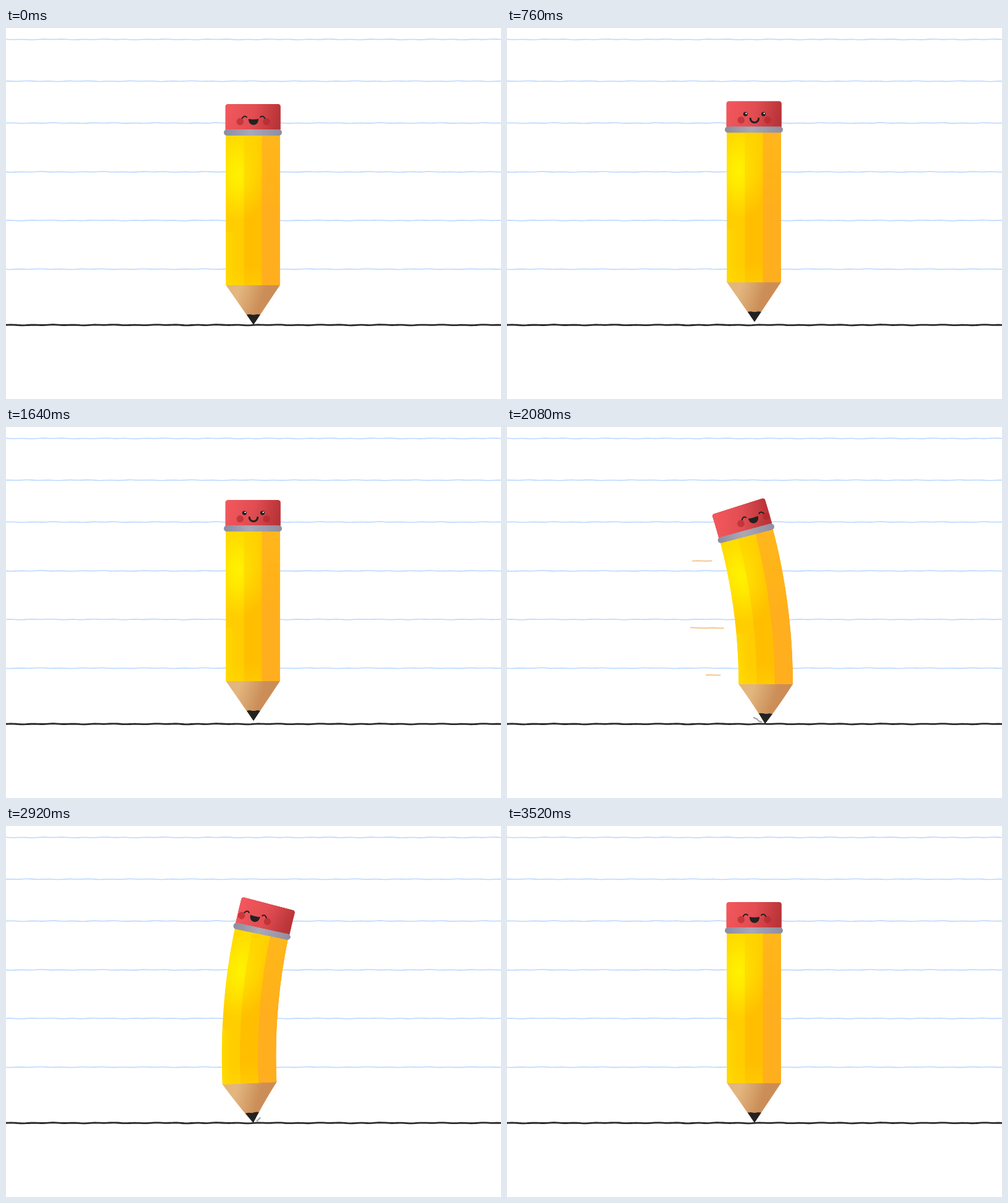
Write an HTML page with a canvas that moves like this. It is 800x600 px and loops after 3560 ms.

```html
<!DOCTYPE html>
<html lang="en">
<head>
<meta charset="utf-8">
<title>Hopping pencil</title>
<style>
  html, body { margin: 0; width: 100%; height: 100%; overflow: hidden; background: #fff; }
  canvas { display: block; }
</style>
</head>
<body>
<canvas id="stage" width="800" height="600"></canvas>
<script>
const ctx = document.getElementById('stage').getContext('2d');
const LOOP = 3560, CYCLE = 890, STEP = 40;
const TIP = 480, HEIGHT = 358;
const INK = '#222';

// The upright pencil is painted here first, then bent onto the stage.
const SCALE = 2, PAD_X = 60, PAD_TOP = 6;
const sprite = document.createElement('canvas');
sprite.width = 2 * PAD_X * SCALE;
sprite.height = (HEIGHT + PAD_TOP) * SCALE;
const pen = sprite.getContext('2d');

const clamp = (v, lo = 0, hi = 1) => Math.min(hi, Math.max(lo, v));
const smooth = (t, a, b) => { const u = clamp((t - a) / (b - a)); return u * u * (3 - 2 * u); };

// Linear interpolation through [time, value] pairs.
function track(t, keys) {
  if (t <= keys[0][0]) return keys[0][1];
  for (let i = 1; i < keys.length; i++) {
    const [t0, v0] = keys[i - 1], [t1, v1] = keys[i];
    if (t <= t1) return v0 + (v1 - v0) * (t - t0) / (t1 - t0);
  }
  return keys[keys.length - 1][1];
}

function gradient(x0, y0, x1, y1, ...stops) {
  const g = pen.createLinearGradient(x0, y0, x1, y1);
  stops.forEach(([at, color]) => g.addColorStop(at, color));
  return g;
}

function glow(x, y, r, color) {
  const g = pen.createRadialGradient(x, y, 0, x, y, r);
  g.addColorStop(0, `rgba(${color},1)`);
  g.addColorStop(0.35, `rgba(${color},.75)`);
  g.addColorStop(1, `rgba(${color},0)`);
  return g;
}

function fill(color, draw) {
  pen.fillStyle = color;
  pen.beginPath();
  draw();
  pen.fill();
}

function polygon(...points) {
  points.forEach(([x, y]) => pen.lineTo(x, y));
  pen.closePath();
}

const disc = (x, y, r, color) => fill(color, () => pen.arc(x, y, r, 0, 7));

function stroke(width, draw) {
  pen.strokeStyle = INK;
  pen.lineWidth = width;
  pen.lineCap = 'round';
  pen.beginPath();
  draw();
  pen.stroke();
}

function paintFace(laughing) {
  const cheekY = laughing ? 151.5 : 153.5;
  for (const x of [378.3, 421]) disc(x, cheekY, 5.7, 'rgba(180,38,44,.62)');
  if (laughing) {
    for (const side of [-1, 1]) {
      stroke(2, () => {
        pen.moveTo(400 + side * 18.3, 146);
        pen.quadraticCurveTo(400 + side * 14.5, 140.5, 400 + side * 11, 144.2);
      });
    }
    fill(INK, () => {
      pen.moveTo(392, 147);
      pen.quadraticCurveTo(400, 148.5, 408, 147);
      pen.bezierCurveTo(408.5, 160, 391.5, 160, 392, 147);
    });
  } else {
    for (const x of [385.3, 414.5]) {
      disc(x, 143.8, 3.6, INK);
      disc(x + 1.2, 142.8, 1.2, '#fff');
    }
    stroke(3, () => {
      pen.moveTo(393.3, 151);
      pen.bezierCurveTo(394, 159.5, 406, 159.5, 406.7, 151);
    });
  }
}

function paintPencil(laughing, look) {
  pen.setTransform(1, 0, 0, 1, 0, 0);
  pen.clearRect(0, 0, sprite.width, sprite.height);
  pen.setTransform(SCALE, 0, 0, SCALE, (PAD_X - 400) * SCALE, (HEIGHT + PAD_TOP - TIP) * SCALE);

  // Wood and lead
  const wood = gradient(378, 424, 425, 440, [0, '#e2b67e'], [0.75, '#cc8f59'], [1, '#cb8d57']);
  fill(wood, () => polygon([355.5, 415], [442.7, 415], [442.7, 416], [400, TIP], [355.5, 416]));
  fill(INK, () => polygon([388.8, 463.5], [394, 463], [400, 464], [406, 463], [411, 463.5], [400, TIP]));

  // Three painted faces with a shared highlight
  [[355.3, 29.4, '#ffcd00'], [384.5, 29.2, '#ffbf00'], [413.5, 29.4, '#ffae1e']].forEach(([x, w, color], i) => {
    const box = () => pen.rect(x, 172, w, 244);
    fill(color, box);
    fill(gradient(0, 172, 0, 310,
      [0, ['rgba(255,214,0,.7)', 'rgba(255,214,0,.8)', 'rgba(255,186,30,.7)'][i]],
      [1, 'rgba(255,190,0,0)']), box);
    pen.save();
    pen.beginPath();
    box();
    pen.clip();
    pen.translate(376, 236);
    pen.scale(0.62, 1);
    pen.globalAlpha = [1, 0.62, 0.1][i];
    pen.fillStyle = glow(0, 0, 78, '255,242,0');
    pen.fillRect(-100, -100, 250, 250);
    pen.restore();
  });
  fill(gradient(355, 0, 372, 0, [0, 'rgba(255,226,0,.55)'], [1, 'rgba(255,226,0,0)']),
    () => pen.rect(355.3, 330, 17, 86));
  fill(gradient(0, 385, 0, 416, [0, 'rgba(255,225,0,0)'], [1, 'rgba(255,225,0,.3)']),
    () => pen.rect(355.3, 385, 58, 31));

  // Eraser, face and ferrule
  pen.save();
  const rubber = gradient(356, 130, 444, 152, [0, '#f2585d'], [0.5, '#e14d52'], [0.95, '#b93438']);
  fill(rubber, () => pen.roundRect(354.5, 123, 89.3, 44, 4));
  pen.clip();
  pen.translate(look, 0);
  paintFace(laughing);
  pen.restore();
  fill(gradient(352, 0, 446, 0, [0, '#8d8ca0'], [0.45, '#aaa8b6'], [1, '#8f8d9f']),
    () => pen.roundRect(352, 164, 94, 10, 5));
}

// Places the painted pencil with its tip at (x, y); lean is in degrees, curve in degrees per pixel.
function placePencil({ x, y, lean = 0, curve = 0, squash = 0 }) {
  const rad = Math.PI / 180;
  ctx.save();
  ctx.translate(x, y);
  ctx.scale(1 + squash, 1 - squash / 2);
  if (Math.abs(curve) < 0.001) {
    ctx.rotate(lean * rad);
    ctx.drawImage(sprite, -PAD_X, -HEIGHT - PAD_TOP, 2 * PAD_X, HEIGHT + PAD_TOP);
  } else {
    const slice = 2;
    let px = 0, py = 0;
    for (let s = 0; s < HEIGHT + PAD_TOP; s += slice) {
      const angle = (lean + curve * (s + slice / 2)) * rad;
      const top = HEIGHT + PAD_TOP - s - slice;
      const h = Math.min(slice + 1, HEIGHT + PAD_TOP - top);
      ctx.save();
      ctx.translate(px, py);
      ctx.rotate(angle);
      ctx.drawImage(sprite, 0, top * SCALE, sprite.width, h * SCALE, -PAD_X, -slice, 2 * PAD_X, h);
      ctx.restore();
      px += Math.sin(angle) * slice;
      py -= Math.cos(angle) * slice;
    }
  }
  ctx.restore();
}

// Slightly uneven hand-drawn horizontal line.
function roughLine(x0, x1, y, width, color, cap = 'butt') {
  ctx.strokeStyle = color;
  ctx.lineWidth = width;
  ctx.lineCap = cap;
  ctx.beginPath();
  for (let x = x0; x < x1; x += 4) {
    ctx.lineTo(x, y + 0.3 * Math.sin(x * 0.19 + y) + 0.25 * Math.sin(x * 0.071 + 2 * y));
  }
  ctx.lineTo(x1, y);
  ctx.stroke();
}

function paper() {
  ctx.fillStyle = '#fff';
  ctx.fillRect(0, 0, 800, 600);
  for (const y of [18.5, 86, 153.7, 232.7, 311.2, 390]) roughLine(0, 800, y, 1.6, '#bcd8ff');
  roughLine(0, 800, 480.3, 2.8, '#2b2b2b');
}

// Each streak: start offset behind centre, length, speed, start time, height, rise.
const STREAKS = [
  [100, 200, 0.96, 268, 216.5, 2],
  [103, 270, 1.25, 258, 325, 1],
  [78, 260, 1.4, 284, 401.3, 4]
];

function streaks(t, dir) {
  for (const [start, length, speed, begin, y, rise] of STREAKS) {
    const front = clamp((t - begin) * speed, 0, length);
    const back = length * clamp((t - 300) / 260) ** 2.2;
    if (front - back < 1) continue;
    const a = 400 - dir * (start - front), b = 400 - dir * (start - back);
    roughLine(Math.min(a, b), Math.max(a, b), y - rise * clamp((t - 300) / 130, 0, 1.5), 2, '#f3c795', 'round');
  }
}

// Dashes kicked up behind the tip: x0, y0, x1, y1.
const DUST = [
  [[6, -3, 11, -8]],
  [[6, -3, 11, -5], [12, -7, 18, -10]],
  [[4, -3, 10, -6], [11, -3, 17, -3], [13, -10, 19, -13], [13, -6, 20, -8]]
];

function dust(t, dir, x) {
  if (t < 240) return;
  ctx.strokeStyle = '#a2a2a2';
  ctx.lineWidth = 2.2;
  ctx.lineCap = 'round';
  ctx.beginPath();
  for (const [x0, y0, x1, y1] of DUST[t < 280 ? 0 : t < 340 ? 1 : 2]) {
    ctx.moveTo(x - dir * x0, TIP + y0);
    ctx.lineTo(x - dir * x1, TIP + y1);
  }
  ctx.stroke();
}

function leaving(t, dir) {
  const x = 400 + dir * 197 * Math.max(0, (t - 240) / 190) ** 2.125;
  if (Math.abs(x - 400) > 700) return;
  const lean = track(t, [[40, 0], [130, -3.7], [190, -6.6], [250, -6.4], [300, -3.8], [430, 2.6], [560, 8]]);
  const curve = track(t, [[90, 0], [130, 0.007], [250, 0.059], [300, 0.06], [430, 0.085], [560, 0.1]]);
  dust(t, dir, x);
  paintPencil(true, dir * 17 * smooth(t, 50, 220));
  placePencil({ x, y: TIP, lean: -dir * lean, curve: -dir * curve });
}

const hop = (t, a, b, height) => t < a || t > b ? 0 : 4 * height * (t - a) * (b - t) / (b - a) ** 2;

function arriving(t, dir) {
  const fall = 531 * (1 - clamp((t - 270) / 240) ** 1.5);
  const lift = fall + hop(t, 510, 700, 27) + hop(t, 700, 800, 4.8);
  const squash = 0.08 * Math.sin(Math.PI * clamp((t - 800) / 48));
  paintPencil(t >= 800, 0);
  placePencil({ x: 400, y: TIP - lift, lean: dir * (1 - smooth(t, 430, 560)), squash });
}

function render(time) {
  const t = time % CYCLE;
  const dir = Math.floor(time / CYCLE) % 2 ? -1 : 1;
  paper();
  streaks(t, dir);
  if (t > 270) arriving(t, dir);
  leaving(t, dir);
}

function tick() {
  render(Math.floor(performance.now() % LOOP / STEP) * STEP);
  requestAnimationFrame(tick);
}
tick();
</script>
</body>
</html>
```
